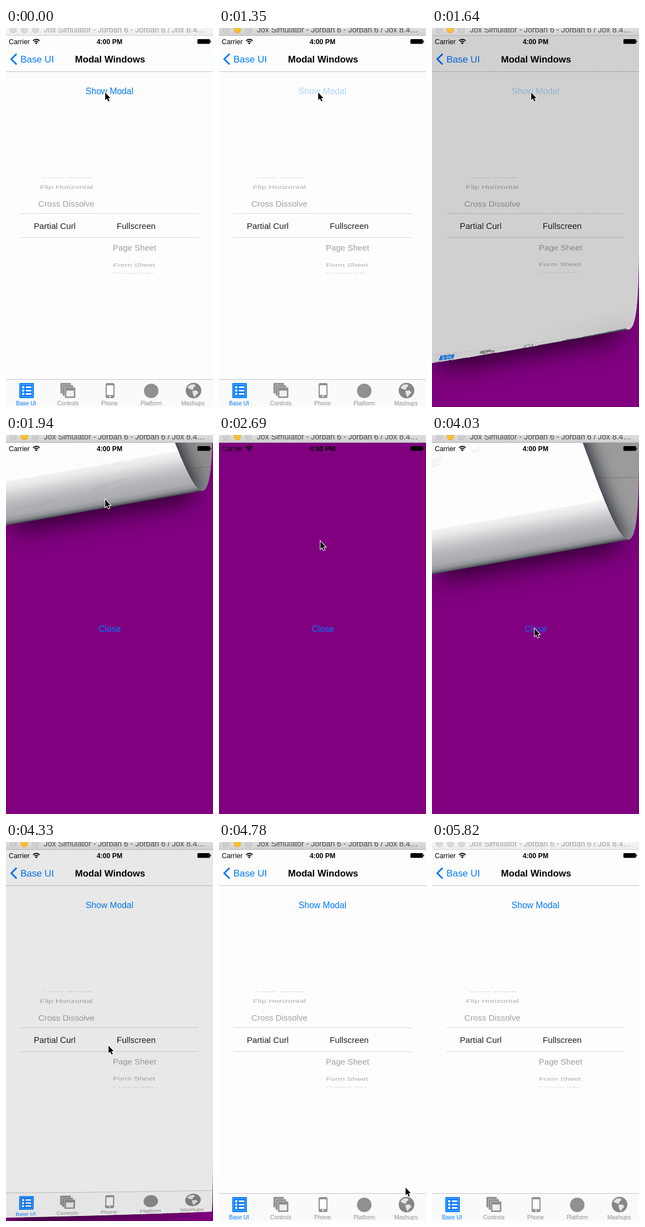
An HTML page with a canvas that plays this animation: 372 by 681 pixels, repeating every 5.92 s.

```html
<!DOCTYPE html>
<html lang="en">
<head>
<meta charset="utf-8">
<title>Page curl modal</title>
<style>
  html, body { margin: 0; width: 100%; height: 100%; overflow: hidden; background: #800080; }
  canvas { display: block; width: 372px; height: 681px; }
</style>
</head>
<body>
<canvas id="stage" width="372" height="681"></canvas>
<script>
const W = 372, H = 681, LOOP = 5920;
const FONT = '"Liberation Sans", Arial, sans-serif';
const BLUE = '#007aff', PAPER = '#fdfdfd', GREY = '#909090';
const FLAT = 900, GONE = -900;

// Curl layers live in coordinates turned so that the roll axis is horizontal.
const K = 2, OX = 130, LW = 520, LH = 760, RADIUS = 185;

const stage = document.getElementById('stage').getContext('2d');
const [sheet, front, back] = [0, 1, 2].map(() => {
  const c = document.createElement('canvas');
  c.width = LW * K;
  c.height = LH * K;
  return c.getContext('2d');
});

// Each step overrides the state before it. roll: where the page leaves the plane.
const steps = [
  { t: 0, active: false, cursor: [178, 115], roll: FLAT, tilt: 10, show: 1, close: 1 },
  { t: 1350, active: true, show: 0.3 },
  { t: 1490, roll: 665, tilt: 7 },
  { t: 1640, roll: 410, tilt: 10 },
  { t: 1790, roll: 175 },
  { t: 1940, roll: -25 },
  { t: 2090, roll: GONE, show: 1 },
  { t: 2690, cursor: [182, 190] },
  { t: 2840, cursor: [174.5, 286] },
  { t: 2990, cursor: [174.5, 340] },
  { t: 3140, cursor: [177, 354] },
  { t: 3590, cursor: [180, 348] },
  { t: 3740, close: 0.25 },
  { t: 3890, close: 0.5, roll: -70 },
  { t: 4030, close: 0.8, roll: 61.5, cursor: [184, 347] },
  { t: 4180, close: 1, roll: 248, cursor: [184, 356] },
  { t: 4330, roll: 568, tilt: 7, cursor: [184, 365] },
  { t: 4480, roll: FLAT, cursor: [240, 507] },
  { t: 4630, cursor: [274, 533] },
  { t: 4780, cursor: [335, 620] },
  { t: 4930, cursor: [341, 655] },
  { t: 5080, cursor: null },
  { t: 5820, active: false }
];
for (let i = 1; i < steps.length; i++) steps[i] = { ...steps[i - 1], ...steps[i] };

function text(c, str, x, y, size, color, { bold = false, align = 'center', squash = 1, alpha = 1 } = {}) {
  c.save();
  c.translate(x, y);
  c.scale(1, squash);
  c.globalAlpha *= alpha;
  c.font = `${bold ? 'bold ' : ''}${size}px ${FONT}`;
  c.textAlign = align;
  c.fillStyle = color;
  c.fillText(str, 0, 0);
  c.restore();
}

function box(c, color, x, y, w, h, r = 0) {
  c.fillStyle = color;
  c.beginPath();
  c.roundRect(x, y, w, h, r);
  c.fill();
}

function disc(c, color, x, y, r) {
  c.fillStyle = color;
  c.beginPath();
  c.arc(x, y, r, 0, Math.PI * 2);
  c.fill();
}

function poly(c, color, pts) {
  c.fillStyle = color;
  c.beginPath();
  pts.forEach(([x, y]) => c.lineTo(x, y));
  c.closePath();
  c.fill();
}

function drawPicker(c) {
  c.save();
  c.beginPath();
  c.rect(0, 268, W, 173.5);
  c.clip();
  text(c, 'Cover Vertical', 110, 270, 14, '#d0d0d0', { squash: 0.3 });
  text(c, 'Flip Horizontal', 108.5, 289.3, 14.9, '#aeaeae', { squash: 0.66 });
  text(c, 'Cross Dissolve', 108.5, 321, 15.15, '#a0a0a0', { squash: 0.92 });
  text(c, 'Partial Curl', 87.5, 361, 15.2, '#222');
  text(c, 'Fullscreen', 234, 361, 15.2, '#222');
  text(c, 'Page Sheet', 231, 399.5, 14.9, '#a0a0a0', { squash: 0.92 });
  text(c, 'Form Sheet', 230, 428.5, 14.5, '#aeaeae', { squash: 0.66 });
  text(c, 'Current Info', 228.5, 442.6, 14, '#d0d0d0', { squash: 0.32 });
  c.restore();
  box(c, '#d6d6d6', 26, 333, 320, 1);
  box(c, '#d6d6d6', 26, 376, 320, 1);
}

function drawTabs(c) {
  box(c, '#fafafa', 0, 631, W, 50);
  box(c, '#c6c6c6', 0, 631, W, 1);

  box(c, BLUE, 24, 638, 26, 27, 1);
  c.strokeStyle = 'rgba(255,255,255,.45)';
  c.lineWidth = 1;
  c.strokeRect(26.5, 640.5, 21, 22);
  for (let i = 0; i < 3; i++) {
    box(c, '#fff', 29, 643.5 + i * 6, 4, 4);
    box(c, '#fff', 35.5, 644 + i * 6, 10, 3);
  }

  for (let i = 0; i < 3; i++) {
    const x = 98 + i * 4, y = 638 + i * 4;
    box(c, '#d8d8d8', x - 0.7, y - 0.7, 19.5, 19.5);
    box(c, GREY, x, y, 18.5, 18.5, 1.5);
    if (i === 2) box(c, '#f0f0f0', x + 2.5, y + 5.5, 13.5, 10.5);
  }

  box(c, GREY, 179, 638, 16, 27, 3);
  box(c, PAPER, 181, 642, 12, 17.5);
  disc(c, PAPER, 187, 662, 1.5);

  disc(c, GREY, 261, 652, 13);

  disc(c, '#868686', 337, 651.5, 14);
  poly(c, '#e4e4e4', [[326, 646], [331, 641], [338, 640], [341, 643], [337, 646], [336, 650], [331, 649]]);
  poly(c, '#e4e4e4', [[335, 652], [342, 651], [346, 655], [341, 660], [339, 664], [336, 658]]);

  text(c, 'Base UI', 36, 677.5, 10.2, BLUE);
  ['Controls', 'Phone', 'Platform', 'Mashups'].forEach((name, i) =>
    text(c, name, 111 + i * 75, 677.5, 10.4, '#8e8e8e'));
}

function drawPage(c, show) {
  box(c, PAPER, 0, 14, W, H - 14);
  box(c, '#c4c4c4', 0, 78, W, 1);
  c.strokeStyle = BLUE;
  c.lineWidth = 3;
  c.beginPath();
  c.moveTo(19, 46.5);
  c.lineTo(9.5, 56);
  c.lineTo(19, 65.5);
  c.stroke();
  text(c, 'Base UI', 26, 62, 16.9, BLUE, { align: 'left' });
  text(c, 'Modal Windows', 187, 62, 16.7, '#000', { bold: true });
  text(c, 'Show Modal', 186, 118.5, 15.6, BLUE, { alpha: show });
  drawPicker(c);
  drawTabs(c);
}

function drawStatus(c) {
  text(c, 'Carrier', 5, 28.5, 12.3, '#000', { align: 'left' });
  text(c, '4:00 PM', 186, 28.5, 12.2, '#000', { bold: true });
  c.strokeStyle = '#000';
  c.lineWidth = 1.8;
  for (const r of [4.7, 8]) {
    c.beginPath();
    c.arc(54.5, 28.5, r, -Math.PI * 0.76, -Math.PI * 0.24);
    c.stroke();
  }
  disc(c, '#000', 54.5, 27.3, 1.6);
  box(c, '#000', 344, 20, 22.5, 8.5, 1.5);
  box(c, '#000', 367, 22.5, 1.3, 3.5, 0.6);
}

function drawTitle(c, active) {
  const g = c.createLinearGradient(0, 0, 0, 14);
  g.addColorStop(0, active ? '#dedede' : '#f4f4f4');
  g.addColorStop(1, active ? '#d0d0d0' : '#ececec');
  c.fillStyle = g;
  c.fillRect(0, 0, W, 14);
  box(c, active ? '#b4b4b4' : '#d4d4d4', 0, 13, W, 1);
  [13, 33, 53].forEach((x, i) => {
    const lit = active && i === 1;
    disc(c, lit ? '#dfa023' : active ? '#bcbcbc' : '#cdcdcd', x, 3, 6.3);
    disc(c, lit ? '#fdbe30' : active ? '#cfcfcf' : '#d8d8d8', x, 3, 5.5);
  });
  text(c, 'Jox Simulator - Jorban 6 - Jorban 6 / Jox 8.4…', 68, 7.5, 14,
    active ? '#4a4a4a' : '#a2a2a2', { align: 'left' });
}

function drawCursor(c, [x, y]) {
  c.save();
  c.translate(x + 0.3, y + 0.6);
  c.strokeStyle = '#fff';
  c.lineWidth = 2;
  poly(c, '#000', [[0, 0.5], [0, 14], [3.1, 11.2], [5.5, 16.4], [7.6, 15.4], [5.3, 10.4], [9.3, 10.4]]);
  c.stroke();
  c.fill();
  c.restore();
}

function reset(c) {
  c.setTransform(1, 0, 0, 1, 0, 0);
  c.globalCompositeOperation = 'source-over';
  c.clearRect(0, 0, LW * K, LH * K);
}

// Copies the sheet row by row; unroll gives the sheet position seen at each height.
function wrap(c, end, unroll) {
  const step = 1 / K;
  for (let y = 0; y < end; y += step) {
    const a = unroll(y), b = unroll(y + step), top = Math.min(a, b);
    if (top >= LH) continue;
    c.drawImage(sheet.canvas, 0, top * K, LW * K, Math.max(Math.abs(a - b), 0.02) * K, 0, y * K, LW * K, 1);
  }
}

function drawCurl(c, { roll, tilt, show }) {
  const angle = tilt * Math.PI / 180;
  const edge = roll + RADIUS;
  const bend = y => Math.asin(Math.min(1, (y - roll) / RADIUS));

  // Soft shadow on the view below
  const low = Math.min(edge, 676);
  c.save();
  c.rotate(-angle);
  c.filter = 'blur(23px)';
  c.fillStyle = 'rgba(0,0,0,.68)';
  c.fillRect(16 - low * Math.tan(angle), low - 150, 326, 162);
  c.restore();

  reset(sheet);
  sheet.setTransform(K, 0, 0, K, OX * K, 0);
  sheet.rotate(angle);
  drawPage(sheet, show);

  reset(front);
  wrap(front, edge, y => y < roll ? y : roll + RADIUS * bend(y));
  front.globalCompositeOperation = 'source-atop';
  front.fillStyle = `rgba(0,0,0,${0.424 - 0.0006 * roll})`;
  front.fillRect(0, 0, LW * K, LH * K);

  // The reverse of the sheet lets the print shine through faintly
  sheet.globalAlpha = 0.92;
  box(sheet, PAPER, 0, 14, W, H - 14);
  sheet.globalAlpha = 1;
  reset(back);
  wrap(back, edge, y => y < roll
    ? 2 * roll + Math.PI * RADIUS - y
    : roll + RADIUS * (Math.PI - bend(y)));
  back.globalCompositeOperation = 'source-atop';
  const g = back.createLinearGradient(0, (edge - 78) * K, 0, edge * K);
  [[0, 0], [0.01, 0.05], [0.15, 0.09], [0.3, 0.18], [0.45, 0.26], [0.6, 0.32],
   [0.8, 0.36], [0.9, 0.46], [0.96, 0.62], [1, 0.82]]
    .forEach(([at, a]) => g.addColorStop(at, `rgba(20,26,36,${a})`));
  back.fillStyle = g;
  back.fillRect(0, 0, LW * K, LH * K);

  // The flap shades the front it hangs over
  front.shadowColor = 'rgba(22,28,40,.95)';
  front.shadowBlur = 32 * K;
  front.shadowOffsetX = 6 * K;
  front.drawImage(back.canvas, 0, 0);
  front.shadowColor = 'transparent';

  c.save();
  c.rotate(-angle);
  for (const layer of [front, back]) c.drawImage(layer.canvas, -OX, 0, LW, LH);
  c.restore();
}

function draw(s) {
  const c = stage;
  box(c, '#800080', 0, 0, W, H);
  if (s.roll === FLAT) {
    drawPage(c, s.show);
  } else {
    text(c, 'Close', 186.5, 353.5, 15.6, BLUE, { alpha: s.close });
    if (s.roll !== GONE) drawCurl(c, s);
  }
  drawStatus(c);
  drawTitle(c, s.active);
  if (s.cursor) drawCursor(c, s.cursor);
}

const start = performance.now();
let shown = null;
function tick() {
  const t = (performance.now() - start) % LOOP;
  const now = steps.findLast(s => s.t <= t);
  if (now !== shown) draw(shown = now);
  requestAnimationFrame(tick);
}
tick();
</script>
</body>
</html>
```
